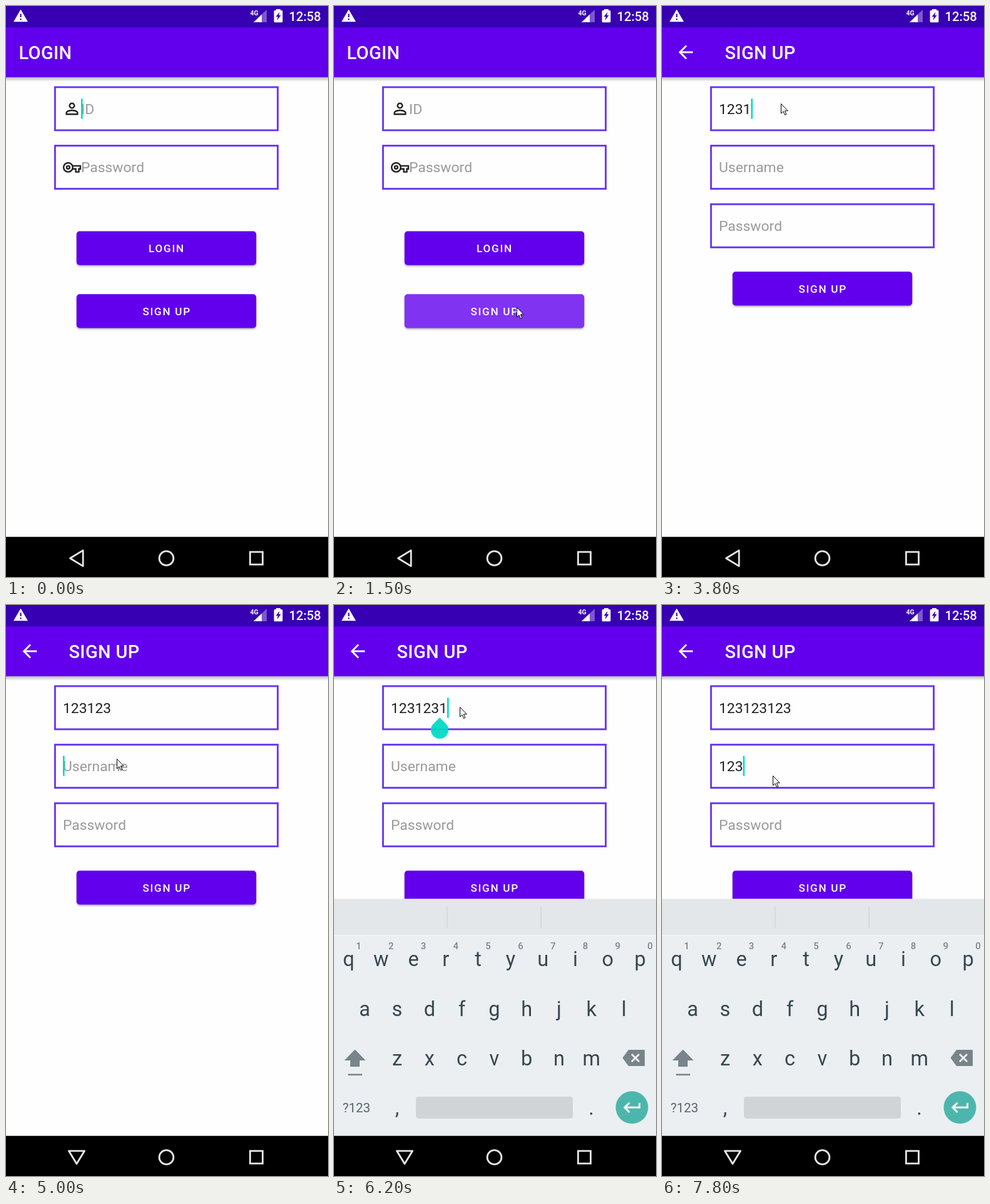
These frames come from a looping animation (515x914 px, 8 s). An HTML page with a canvas:

```html
<!DOCTYPE html>
<html lang="en">
<head>
<meta charset="utf-8">
<title>Sign up flow</title>
<style>
html, body { margin: 0; width: 100%; height: 100%; overflow: hidden; background: #fefefe; }
canvas { display: block; width: 515px; height: 914px; }
</style>
</head>
<body>
<canvas id="stage" width="515" height="914"></canvas>
<script>
const W = 515, H = 914, LOOP = 8000, STEP = 100, BLINK = 500;
const DP = W / 360;
const PURPLE = '#6200ee', DARK = '#3700b3', TEAL = '#03dac5', INK = '#222';
const KEY_INK = '#37474f', KEY_GREY = '#78848a', KEY_BG = '#ebeff2';
const BAR_TOP = 24 * DP, BAR_END = 80 * DP - 0.4, NAV_TOP = 594 * DP, KEYS_TOP = 470.5;

const main = document.getElementById('stage').getContext('2d');
const layer = Object.assign(document.createElement('canvas'), { width: W, height: H });
const layerCtx = layer.getContext('2d');
let c = main;

const ARROW = new Path2D('M.5 .5V16L4 12.7L6.5 18.5L8.8 17.5L6.4 11.8H11.3Z');

// Pointer stops: time, x, y
const POINTER = [
  [300, 294, 556], [800, 293, 482], [1700, 292, 482], [2100, 248, 203], [2300, 190, 156],
  [4000, 190, 156], [4500, 177, 247], [5000, 177, 246], [5800, 201, 156], [6200, 201, 163],
  [6800, 177, 268], [7800, 177, 273]
];
const FOCUS = [[0, 'login'], [2400, 'id'], [5000, 'name'], [6000, 'id'], [6900, 'name']];

const burst = (field, start, gap, count) =>
  Array.from({ length: count }, (_, i) => ({ field, at: start + i * gap }));
const PRESSES = [...burst('id', 2900, 300, 6), ...burst('id', 6200, 250, 3), ...burst('name', 7300, 250, 3)];

const clamp = v => Math.max(0, Math.min(1, v));
const progress = (t, a, b) => clamp((t - a) / (b - a));
const typed = (t, field) =>
  '123'.repeat(3).slice(0, PRESSES.filter(p => p.field === field && p.at <= t).length);

// The caret restarts its blink at each focus change and key press
function caretOn(t, field) {
  const [since, focused] = FOCUS.findLast(f => f[0] <= t);
  const press = PRESSES.findLast(p => p.at <= t);
  const from = Math.max(since, press ? press.at : 0);
  return focused === field && (t - from) % (2 * BLINK) < BLINK;
}

function rect(x, y, w, h, fill) {
  c.fillStyle = fill;
  c.fillRect(x, y, w, h);
}

function rounded(x, y, w, h, r, fill) {
  c.beginPath();
  c.roundRect(x, y, w, h, r);
  c.fillStyle = fill;
  c.fill();
}

function trace(points) {
  c.beginPath();
  points.forEach(([x, y]) => c.lineTo(x, y));
}

function poly(points, fill) {
  trace(points);
  c.fillStyle = fill;
  c.fill();
}

function line(points, width, color) {
  trace(points);
  c.lineWidth = width;
  c.strokeStyle = color;
  c.stroke();
}

function disc(x, y, r, fill) {
  c.beginPath();
  c.arc(x, y, r, 0, 7);
  c.fillStyle = fill;
  c.fill();
}

function ring(x, y, r, width, color) {
  c.beginPath();
  c.arc(x, y, r, 0, 2 * Math.PI);
  c.lineWidth = width;
  c.strokeStyle = color;
  c.stroke();
}

function text(str, x, y, size, fill, { weight = 400, gap = 0, align = 'left' } = {}) {
  c.font = `${weight} ${size}px Roboto, sans-serif`;
  c.letterSpacing = gap + 'px';
  c.textAlign = align;
  c.fillStyle = fill;
  c.fillText(str, x, y);
  c.letterSpacing = '0px';
}

function leftArrow(x, y, wing) {
  line([[x + wing, y - wing], [x, y], [x + wing, y + wing]], 2 * DP, '#fff');
}

// Draws in 24-unit icon space around the given centre
function icon(cx, cy, scale, draw) {
  c.save();
  c.translate(cx, cy);
  c.scale(scale, scale);
  c.translate(-12, -12);
  draw();
  c.restore();
}

function personIcon() {
  ring(12, 8, 3, 2, INK);
  c.stroke(new Path2D('M5 19V17C5 15.5 9 14 12 14S19 15.5 19 17V19Z'));
}

function keyIcon() {
  ring(7, 12, 6, 2, INK);
  ring(7, 12, 2, 2, INK);
  line([[12.6, 10], [23, 10], [23, 14], [21, 14], [21, 18], [17, 18], [17, 14], [12.6, 14]], 2, INK);
}

function statusIcons() {
  poly([[23.5, 5.5], [35, 25.2], [12, 25.2]], '#fff');
  rect(22.5, 12.5, 2.1, 5.5, DARK);
  rect(22.5, 20, 2.1, 2.3, DARK);
  poly([[417, 6], [417, 26], [396, 26]], 'rgba(255,255,255,.35)');
  poly([[409, 13.6], [409, 26], [396, 26]], '#fff');
  text('4G', 390.5, 14.5, 10.5, '#fff', { weight: 700 });
  rect(432, 5, 7, 3, '#fff');
  rounded(428.6, 7, 13.8, 19.3, 1.5, '#fff');
  poly([[437.5, 9.5], [431.5, 17.2], [434.8, 17.2], [433.6, 23], [439.6, 14.8], [436.2, 14.8]], DARK);
  text('12:58', 452.4, 23.6, 20.3, '#fff', { weight: 500 });
}

function appBar(title, x) {
  rect(0, 0, W, H, '#fefefe');
  const shade = c.createLinearGradient(0, BAR_END, 0, BAR_END + 7);
  shade.addColorStop(0, 'rgba(0,0,0,.28)');
  shade.addColorStop(1, 'rgba(0,0,0,0)');
  rect(0, BAR_END, W, 7, shade);
  rect(0, 0, W, BAR_END, PURPLE);
  rect(0, 0, W, BAR_TOP, DARK);
  text(title, x, 84.5, 29, '#fff', { weight: 500, gap: 0.35 });
}

function field(row, hint, value, caret, x = 91) {
  const y = 128.4 + row * 93.7;
  const base = Math.floor(y + 44.6);
  c.strokeStyle = '#6535f0';
  c.lineWidth = 2 * DP;
  c.strokeRect(78.4, y + 1.5, 356.2, 69);
  text(value || hint, x, base, 16 * DP, value ? '#212121' : '#9a9a9a');
  if (caret) {
    const end = value ? c.measureText(value).width : 0;
    rect(x + end, base - 24.6, 2.6, 32.2, TEAL);
  }
}

function button(label, x, y, ripple) {
  c.save();
  c.shadowColor = 'rgba(0,0,0,.3)';
  c.shadowBlur = 3;
  c.shadowOffsetY = 2;
  rounded(112.8, y, 287.4, 54.3, 5, PURPLE);
  c.shadowColor = 'transparent';
  if (ripple) {
    c.clip();
    disc(259, y + 27, ripple, 'rgba(255,255,255,.2)');
  }
  c.restore();
  text(label, x, y + 33.4, 12 * DP, '#fff', { weight: 500, gap: 1.7 });
}

function loginScreen(t) {
  appBar('LOGIN', 20.4);
  field(0, 'ID', '', caretOn(t, 'login'), 120);
  field(1, 'Password', '', false, 120);
  icon(105.5, 164.5, 1.26, personIcon);
  icon(105.5, 258.3, 1.22, keyIcon);
  button('LOGIN', 228, 360.5);
  button('SIGN UP', 218.4, 461.2, t < 1400 ? 0 : 139.5 + (t - 1400) * 0.2);
}

function textHandle() {
  c.save();
  c.globalAlpha = 0.94;
  c.translate(169, 200);
  c.rotate(Math.PI / 4);
  rounded(-14, -14, 28, 28, [0, 14, 14, 14], TEAL);
  c.restore();
}

function signUpScreen(t) {
  appBar('SIGN UP', 100.5);
  leftArrow(28.6, 74, 10.4);
  line([[28.6, 74], [49.4, 74]], 2 * DP, '#fff');
  field(0, 'ID', typed(t, 'id'), caretOn(t, 'id'));
  field(1, 'Username', typed(t, 'name'), caretOn(t, 'name'));
  field(2, 'Password', '', false);
  button('SIGN UP', 218.4, 425.2);
  if (t >= 6000 && t < 6300) textHandle();
}

function keyRow(keys, x, row) {
  const y = Math.round(578.4 + row * 79.4);
  [...keys].forEach((k, i) => text(k, x + i * 51.8, y, 32.5, KEY_INK, { align: 'center' }));
}

function keyboard() {
  rect(0, KEYS_TOP, W, H, KEY_BG);
  rect(0, KEYS_TOP, W, 57.5, '#e3e7e9');
  rect(0, 528, W, 1.2, '#f4f7f8');
  [181, 331].forEach(x => rect(x - 0.5, 483, 1, 34, '#c9ced1'));
  ['qwertyuiop', 'asdfghjkl', 'zxcvbnm'].forEach((keys, row) =>
    keyRow(keys, [23.4, 49.2, 101][row], row));
  [...'1234567890'].forEach((n, i) =>
    text(n, 39.4 + i * 51.8, 551, 15, '#7b858a', { weight: 500, align: 'center' }));

  poly([[33.5, 711.5], [50.5, 729], [16.5, 729]], KEY_GREY);
  rect(26, 728, 15, 11, KEY_GREY);
  rect(22.5, 750.5, 22.5, 2.6, KEY_GREY);

  poly([[461.5, 725], [471, 712], [497, 712], [497, 738], [471, 738]], KEY_GREY);
  [-6, 6].forEach(d => line([[476, 725 - d], [488, 725 + d]], 2.8, KEY_BG));

  text('?123', 13.8, 812, 20.5, '#59666c');
  text(',', 101, 816, 32.5, KEY_INK, { align: 'center' });
  text('.', 411.5, 816, 32.5, KEY_INK, { align: 'center' });
  rounded(131, 787, 251, 35, 4.5, '#d0d4d7');
  disc(476.5, 804.3, 26, '#4db6ac');
  leftArrow(464.9, 804.3, 7.6);
  line([[464.9, 804.3], [488.6, 804.3], [488.6, 797]], 2 * DP, '#fff');
}

function navBar(keyboardOpen) {
  const color = '#e6e6e6', width = 2.8;
  rect(0, NAV_TOP, W, H, '#000');
  c.save();
  c.lineJoin = 'round';
  c.translate(113, 884);
  if (keyboardOpen) c.rotate(-Math.PI / 2);
  line([[-10.5, 0], [10.2, -12.6], [10.2, 12.6], [-10.5, 0], [10.2, -12.6]], width, color);
  c.restore();
  ring(256.5, 884, 11.4, width, color);
  c.strokeRect(390.4, 873.9, 20.1, 20.1);
}

function pointer(t) {
  if (t < POINTER[0][0]) return;
  const a = POINTER.findLast(k => k[0] <= t);
  const b = POINTER.find(k => k[0] > t) || a;
  const p = a === b ? 0 : progress(t, a[0], b[0]);
  const [x, y] = [1, 2].map(i => Math.round(a[i] + (b[i] - a[i]) * p));
  c.save();
  c.translate(x, y);
  c.fillStyle = '#fff';
  c.fill(ARROW);
  c.strokeStyle = '#000';
  c.lineWidth = 1;
  c.stroke(ARROW);
  c.restore();
}

// Draws on a separate layer so that it fades as a whole
function slideIn(draw, p, distance) {
  c = layerCtx;
  c.clearRect(0, 0, W, H);
  draw();
  c = main;
  c.globalAlpha = clamp(p * 1.6);
  c.drawImage(layer, 0, distance * (1 - p) ** 4);
  c.globalAlpha = 1;
}

function render(t) {
  const screen = progress(t, 1500, 2000);
  const keys = progress(t, 5000, 5400);
  if (screen < 1) loginScreen(t);
  if (screen > 0) slideIn(() => signUpScreen(t), screen, 73);
  if (keys > 0) slideIn(keyboard, keys, 76);
  statusIcons();
  navBar(t >= 5000);
  pointer(t);
}

const start = performance.now();
function tick() {
  const t = (performance.now() - start) % LOOP;
  render(Math.floor(t / STEP) * STEP);
  requestAnimationFrame(tick);
}
tick();
</script>
</body>
</html>
```
